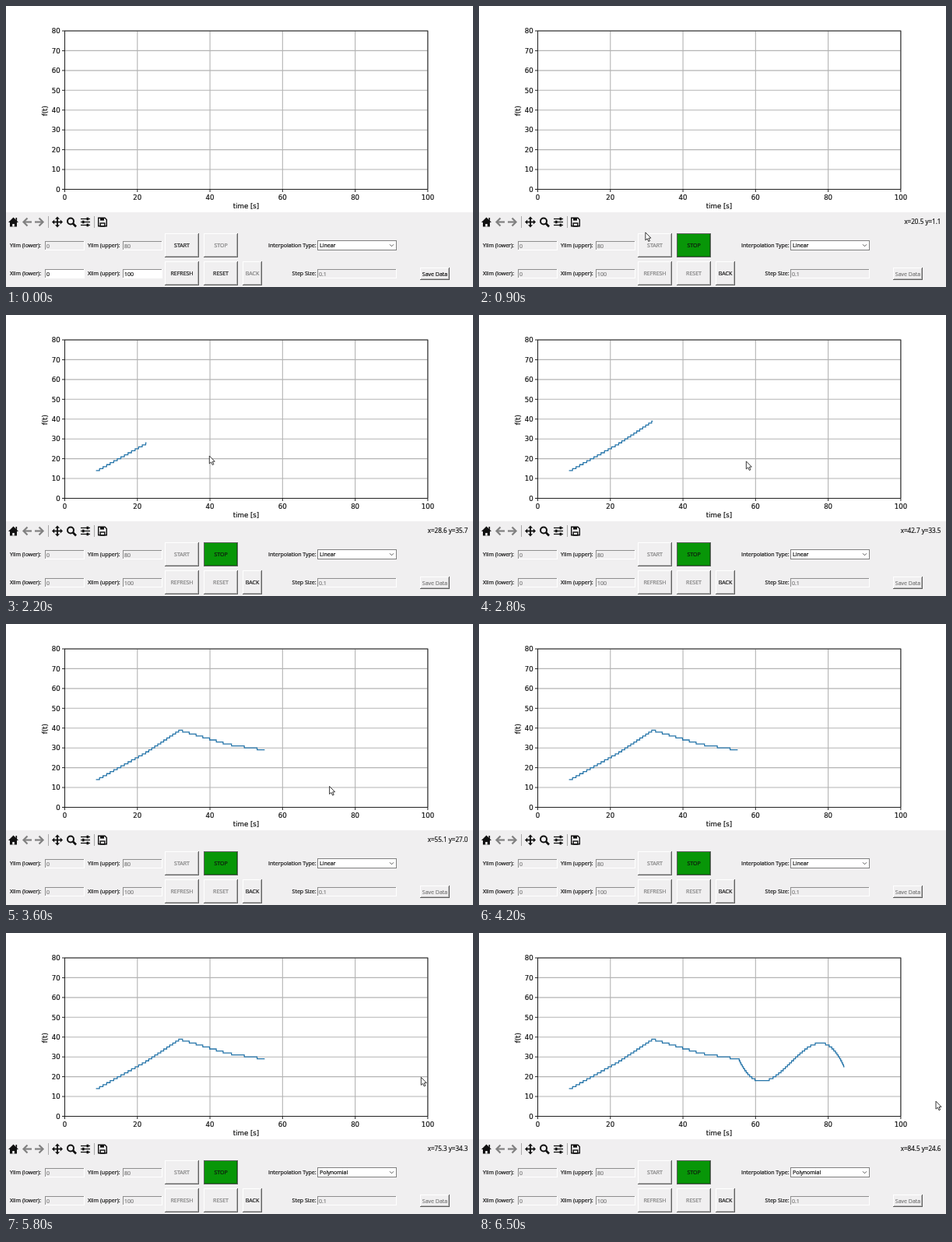
An HTML page with a canvas for the animation above (6.6 s loop, 600 by 361 pixels).

```html
<!DOCTYPE html>
<html lang="en">
<head>
<meta charset="utf-8">
<title>Signal recorder</title>
<style>
html, body { margin: 0; width: 600px; height: 361px; overflow: hidden; background: #fff; }
canvas { display: block; }
</style>
</head>
<body>
<canvas id="stage" width="600" height="361"></canvas>
<script>
const LOOP = 6600, STEP = 100;
const START_AT = 400, BUSY_AT = 1600, MODE_AT = 4600, CUBIC_AT = 6400;
const c = document.getElementById('stage').getContext('2d');
const UI = '7px "Open Sans", sans-serif';
const READOUT = '8.1px "Open Sans", sans-serif';
const PLOT = '8.6px "DejaVu Sans", sans-serif';
const INK = '#111', GRAY = '#7c7c7c', PANEL = '#f0eff0', GREEN = '#089608';

// Data units to plot pixels
const px = v => 75.5 + v * 4.664;
const py = v => 235.5 - v * 2.544;

// Pointer stops: time, then position in data units
const clicks = [
  [1600, 8.6, 14], [2000, 22.5, 28.2], [2300, 31.7, 39.4], [2900, 44.9, 32.3], [3500, 55.1, 29.4]
];
const stops = [
  [700, 32, -28], [900, 20.5, 1.1], ...clicks,
  [3600, 55.1, 27], [4100, 80, -28], [4700, 80, -28],
  [5000, 64.5, 11.8], [5200, 62, 18], [5900, 77.5, 37], [6400, 84.5, 24.6]
];
const knots = clicks.map(([, x, y]) => [x, y]);

// Linear interpolation in rows of [key, ...values]
function along(rows, key) {
  const i = rows.findIndex(r => r[0] >= key);
  if (i < 1) return rows.at(i).slice(1);
  const a = rows[i - 1], b = rows[i], k = (key - a[0]) / (b[0] - a[0]);
  return a.slice(1).map((v, j) => v + (b[j + 1] - v) * k);
}

function signal(x) {
  if (x < 55.4) return along(knots, x)[0];
  const u = (x - 69.8) / 8.08;
  return 27.8 + 9.65 * (1.5 * u - 0.5 * u ** 3);
}

function text(s, x, y, align = 'left', color = INK, font = UI) {
  c.font = font;
  c.textAlign = align;
  c.fillStyle = c.strokeStyle = color;
  c.lineWidth = 0.2;
  c.fillText(s, x, y);
  c.strokeText(s, x, y);
}

function rect(x, y, w, h, color) {
  c.fillStyle = color;
  c.fillRect(x, y, w, h);
}

function trace(points, close) {
  c.beginPath();
  points.forEach(([x, y]) => c.lineTo(x, y));
  if (close) c.closePath();
}

function line(points, color = INK, width = 1, close = false) {
  trace(points, close);
  c.strokeStyle = color;
  c.lineWidth = width;
  c.stroke();
}

function fill(points, color = INK) {
  trace(points, true);
  c.fillStyle = color;
  c.fill();
}

function ring(x, y, r, color, width, from = 0, to = 2 * Math.PI) {
  c.beginPath();
  c.arc(x, y, r, from, to);
  c.strokeStyle = color;
  c.lineWidth = width;
  c.stroke();
}

function at(x, y, draw, turn = 0, flip = 1) {
  c.save();
  c.translate(x, y);
  c.rotate(turn);
  c.scale(flip, 1);
  draw();
  c.restore();
}

function axes() {
  for (let v = 0; v <= 100; v += 20) {
    const x = px(v);
    line([[x, 32], [x, 235]], '#b4b4b4', 1.1);
    line([[x, 236], [x, 239]], '#222');
    text(v, x, 249.2, 'center', INK, PLOT);
  }
  for (let v = 0; v <= 80; v += 10) {
    const y = py(v);
    line([[75, y], [542, y]], '#b4b4b4', 1.1);
    line([[72, y], [75, y]], '#222');
    text(v, 69.8, y + 3.2, 'right', INK, PLOT);
  }
  c.strokeStyle = '#222';
  c.lineWidth = 1;
  c.strokeRect(px(0), py(80), px(100) - px(0), py(0) - py(80));
  text('time [s]', 308.5, 259.6, 'center', INK, PLOT);
  at(53.2, 134.8, () => text('f(t)', 0, 0, 'center', INK, PLOT), -Math.PI / 2);
}

function curve(t) {
  const last = clicks.findLast(k => k[0] < t);
  const end = t >= CUBIC_AT ? 84.5 : last ? last[1] : 0;
  const points = [];
  for (let x = 8.6; x <= end; x += 0.04) points.push([px(x), py(Math.floor(signal(x) + 0.001))]);
  line(points, '#2373a8', 1.3);
}

function home() {
  fill([[0, -6], [6.5, 0.5], [-6.5, 0.5]]);
  rect(-4.5, 0, 9, 6, INK);
  rect(-1.3, 2.5, 2.6, 3.5, PANEL);
  rect(3, -5.5, 1.6, 4, INK);
}

function arrow() {
  line([[0.5, -5], [-4.5, 0], [0.5, 5]], '#808080', 2.2);
  line([[-4, 0], [6, 0]], '#808080', 2.2);
}

function pan() {
  for (let i = 0; i < 4; i++) {
    c.rotate(Math.PI / 2);
    rect(-0.9, -5, 1.8, 5, INK);
    fill([[0, -7], [3, -3.8], [-3, -3.8]]);
  }
}

function zoom() {
  ring(-1, -1, 4, INK, 2);
  line([[2, 2], [6, 6]], INK, 2.6);
}

function sliders() {
  for (let i = -1; i < 2; i++) {
    line([[-6, i * 4], [6, i * 4]], INK, 1.3);
    rect(i ? 1.5 : -4, i * 4 - 1.8, 2.6, 3.6, INK);
  }
}

function save() {
  line([[-5.3, -5.3], [3, -5.3], [5.3, -3], [5.3, 5.3], [-5.3, 5.3]], INK, 1.4, true);
  rect(-3, -5.5, 5, 3.6, INK);
  c.strokeRect(-2.8, 1.5, 5.6, 4);
}

function toolbar() {
  const y = 277.5;
  at(9.5, y, home);
  at(27, y, arrow);
  at(43, y, arrow, 0, -1);
  at(66, y, pan);
  at(84, y, zoom);
  at(102, y, sliders);
  at(124, y, save);
  for (const x of [54.5, 113.5]) line([[x, 270], [x, 285]], '#a8a8a8');
}

function field(x, y, w, value, enabled) {
  rect(x, y, w, 12, '#fff');
  rect(x, y, w - 1, 11, '#8e8e8e');
  rect(x + 1, y + 1, w - 2, 10, enabled ? '#fff' : PANEL);
  text(value, x + 2, y + 8.5, 'left', enabled ? INK : GRAY);
}

function button(label, x, y, w, h, enabled, color = PANEL) {
  rect(x, y, w, h, '#606060');
  if (color === PANEL) rect(x, y, w - 1, h - 1, '#fff');
  rect(x + 1, y + 1, w - 2, h - 2, color === PANEL ? '#b4b4b4' : '#0a6a0a');
  rect(x + 1, y + 1, w - 3, h - 3, color);
  text(label, x + w / 2, y + h / 2 + 2.6, 'center', enabled ? INK : GRAY);
}

function controls(t) {
  const on = t >= START_AT;
  [['Ylim', 302, '80', false], ['Xlim', 338, '100', !on]].forEach(([name, y, upper, enabled]) => {
    text(name + ' (lower):', 5, y + 8.3);
    text(name + ' (upper):', 105, y + 8.3);
    field(50, y, 51, '0', enabled);
    field(150, y, 51, upper, enabled);
  });
  button('START', 204, 292, 44, 31, !on);
  button('STOP', 254, 292, 44, 31, on, on ? GREEN : PANEL);
  button('REFRESH', 204, 328, 44, 31, !on);
  button('RESET', 254, 328, 44, 31, !on);
  button('BACK', 304, 328, 25, 31, on);
  button('Save Data', 532, 336, 38, 16, !on);

  text('Interpolation Type:', 398.6, 310.3, 'right');
  text('Step Size:', 398.6, 346.3, 'right');
  field(400, 338, 102, '0.1', false);
  rect(400, 301, 102, 13, '#808080');
  rect(401, 302, 100, 11, '#fff');
  text(t >= MODE_AT ? 'Polynomial' : 'Linear', 403, 310.3, 'left', '#000');
  line([[493, 306.3], [495.5, 308.8], [498, 306.3]], '#555');
}

function pointer(t) {
  const [x, y] = along(stops, t);
  if (y >= 0) text(`x=${x.toFixed(1)} y=${y.toFixed(1)}`, 593.5, 280, 'right', INK, READOUT);
  at(px(x) * 1.25, py(y) * 1.25, () => {
    if (Math.abs(t - BUSY_AT) <= 100) {
      ring(10.2, 11, 4.6, '#3f8fc4', 2.8);
      ring(10.2, 11, 4.6, '#8fd0ee', 2.2, t / 130, t / 130 + 2);
      return;
    }
    const shape = [[0, 0], [0, 10], [2.3, 8], [4, 11.6], [5.6, 10.8], [4, 7.4], [7, 7.2]];
    fill(shape, '#fff');
    line(shape, '#222', 0.9, true);
  });
}

function draw(t) {
  rect(0, 0, 600, 361, '#fff');
  axes();
  curve(t);
  rect(0, 265, 600, 96, PANEL);
  toolbar();
  controls(t);
  pointer(t);
}

const start = performance.now();
function frame() {
  const t = (performance.now() - start) % LOOP;
  draw(Math.floor(t / STEP) * STEP);
  requestAnimationFrame(frame);
}
frame();
</script>
</body>
</html>
```
